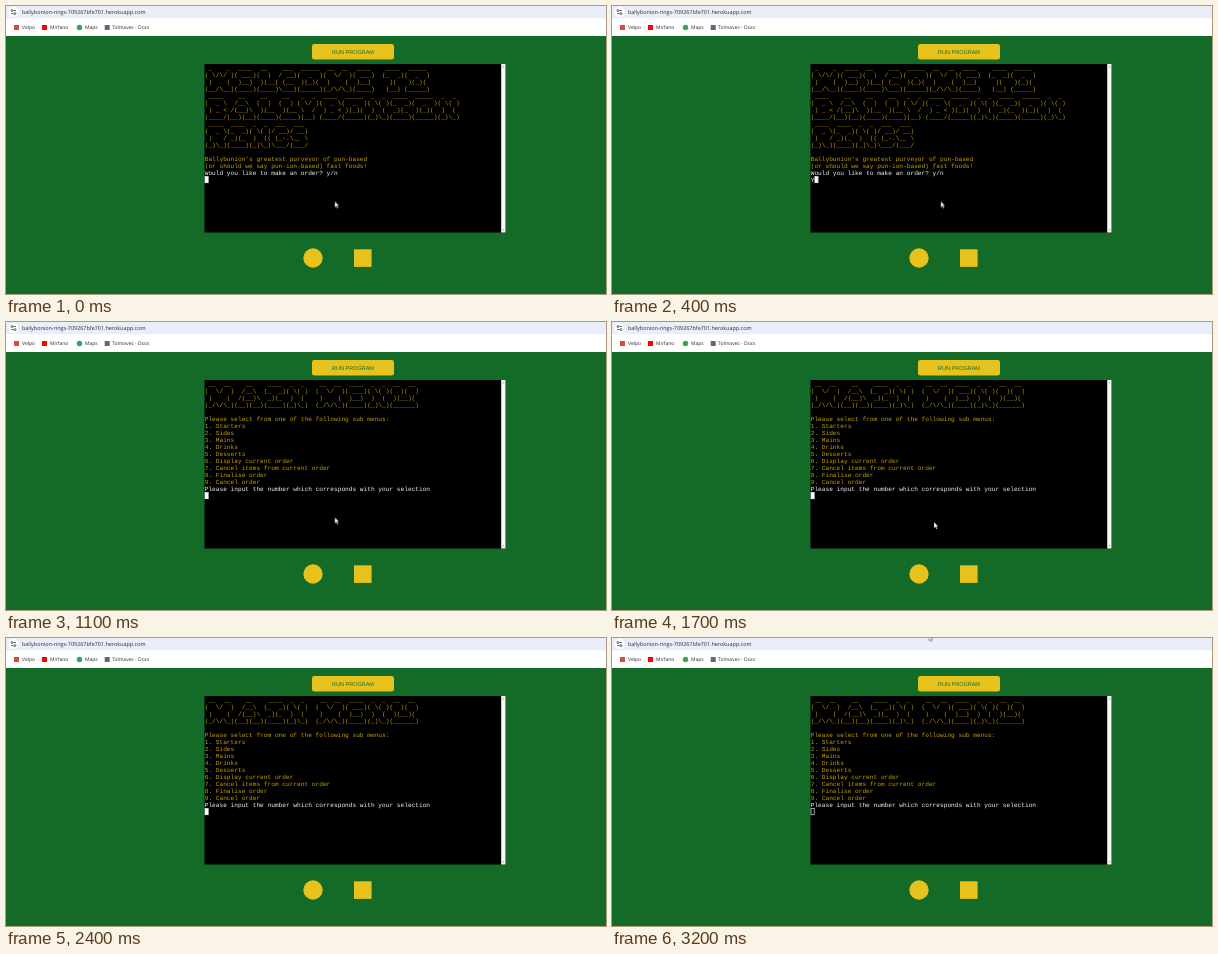
Write an HTML page that moves like this. It is 600 px wide and 288 px high and loops after 3.3 s.

```html
<!DOCTYPE html>
<html lang="en">
<head>
<meta charset="utf-8">
<title>Terminal order demo</title>
<style>
  html, body { margin: 0; width: 100%; height: 100%; overflow: hidden; background: #146a27; }
  svg { display: block; width: 600px; height: 288px; }
  text { text-rendering: geometricPrecision; }
  .bar { font-family: "Open Sans", "Noto Sans", sans-serif; fill: #2b2d30; }
  .url { font-size: 5.45px; }
  .mark { font-size: 5px; }
  .btn { font: 5.5px "Liberation Sans", Arial, sans-serif; fill: #146a27; text-anchor: middle; }
  .term { font: 6.175px "Liberation Mono", "Courier New", monospace; }
  .gold { fill: #c4a000; }
  .white { fill: #f4f4f4; }
</style>
</head>
<body>
<svg viewBox="0 0 600 288">
  <rect width="600" height="288" fill="#146a27"/>
  <rect width="600" height="30" fill="#fff"/>
  <rect width="600" height="12.3" fill="#e9eef8"/>
  <circle cx="7.5" cy="6" r="5" fill="#fff"/>
  <g fill="none" stroke="#3c4043" stroke-width=".8">
    <path d="M7.4 4.5H10M5 7.6H7.6"/>
    <circle cx="6" cy="4.5" r="1"/>
    <circle cx="9" cy="7.6" r="1"/>
  </g>
  <g class="bar">
    <text class="url" x="16" y="8.1">ballybonion-rings-709267bfe701.herokuapp.com</text>
    <g class="mark">
      <text x="16" y="23.2">Velpo</text>
      <text x="44" y="23.2">Mirfano</text>
      <text x="79" y="23.2">Maps</text>
      <text x="106" y="23.2">Tolmavec - Docs</text>
    </g>
  </g>
  <rect x="8" y="19" width="5" height="5" fill="#dc4a3d"/>
  <rect x="36" y="19" width="5" height="5" fill="#f00"/>
  <circle cx="73.5" cy="21.5" r="2.7" fill="#34a853"/>
  <rect x="98.7" y="19" width="5" height="5" fill="#66696d"/>

  <rect x="306" y="38" width="82" height="15.6" rx="2.4" fill="#e8c21c"/>
  <text class="btn" x="347" y="47.9">RUN PROGRAM</text>

  <rect x="198.5" y="58" width="301" height="168.5" fill="#000"/>
  <rect x="495.2" y="58" width="4.3" height="168.5" fill="#f8f8f8"/>
  <path d="M496.4 61.2l1-1.2 1 1.2zM496.4 223.3l1 1.2 1-1.2z" fill="#999"/>
  <g class="term">
    <g id="welcome"></g>
    <g id="menu"></g>
    <g id="reply"></g>
  </g>
  <rect id="block" x="199" y="58.5" width="3.2" height="6.3" fill="#fff" stroke="#fff" stroke-width=".6"/>

  <circle cx="307" cy="252" r="9.7" fill="#e8c21c"/>
  <rect x="348" y="243.3" width="17.6" height="17.6" fill="#e8c21c"/>

  <path id="mouse" d="M0 0V6.2L1.4 5 2.4 7.2 3.4 6.8 2.4 4.6H4.3Z" fill="#fff" stroke="#222" stroke-width=".4"/>
</svg>
<script>
const LOOP = 3300, COL = 3.705, ROW = 7;
const $ = id => document.getElementById(id);

const welcomeArt = String.raw`
 _    _  ____  __    ___  _____  __  __  ____    ____  _____
( \/\/ )( ___)(  )  / __)(  _  )(  \/  )( ___)  (_  _)(  _  )
 )    (  )__)  )(__( (__  )(_)(  )    (  )__)     )(   )(_)(
(__/\__)(____)(____)\___)(_____)(_/\/\_)(____)   (__) (_____)
 ____    __    __    __   _  _  ____  _____  _  _  ____  _____  _  _
(  _ \  /__\  (  )  (  ) ( \/ )(  _ \(  _  )( \( )(_  _)(  _  )( \( )
 ) _ < /(__)\  )(__  )(__ \  /  ) _ < )(_)(  )  (  _)(_  )(_)(  )  (
(____/(__)(__)(____)(____)(__) (____/(_____)(_)\_)(____)(_____)(_)\_)
 ____  ____  _  _  ___  ___
(  _ \(_  _)( \( )/ __)/ __)
 )   / _)(_  )  (( (_-.\__ \
(_)\_)(____)(_)\_)\___/(___/

Ballybunion's greatest purveyor of pun-based
(or should we say pun-ion-based) fast foods!`;

const menuArt = String.raw`
 __  __    __    ____  _  _    __  __  ____  _  _  __  __
(  \/  )  /__\  (_  _)( \( )  (  \/  )( ___)( \( )(  )(  )
 )    (  /(__)\  _)(_  )  (    )    (  )__)  )  (  )(__)(
(_/\/\_)(__)(__)(____)(_)\_)  (_/\/\_)(____)(_)\_)(______)

Please select from one of the following sub menus:
1. Starters
2. Sides
3. Mains
4. Drinks
5. Desserts
6. Display current order
7. Cancel items from current order
8. Finalise order
9. Cancel order`;

function print(id, text, color, row = 0) {
  text.split("\n").forEach((line, i) => {
    const t = document.createElementNS("http://www.w3.org/2000/svg", "text");
    t.setAttribute("x", 198.7);
    t.setAttribute("y", 58 + (row + i) * ROW + 5.6);
    t.setAttribute("class", color);
    t.textContent = line.replace(/ /g, "\u00a0");
    $(id).append(t);
  });
}

print("welcome", welcomeArt.slice(1), "gold");
print("welcome", "Would you like to make an order? y/n", "white", 15);
print("menu", menuArt.slice(1), "gold");
print("menu", "Please input the number which corresponds with your selection", "white", 15);
print("reply", "Y", "white", 16);

// Each step is [time in ms, value], held until the next one.
function play(id, prop, steps) {
  const frames = steps.map(([t, v]) => ({ offset: t / LOOP, [prop]: v, easing: "step-end" }));
  frames.push({ offset: 1, [prop]: steps.at(-1)[1] });
  $(id).animate(frames, { duration: LOOP, iterations: Infinity }).startTime = 0;
}

const move = (x, y) => `translate(${x}px, ${y}px)`;
const cell = (col, row) => move(col * COL, row * ROW);

play("welcome", "opacity", [[0, 1], [1100, 0]]);
play("menu", "opacity", [[0, 0], [1100, 1]]);
play("reply", "opacity", [[0, 0], [100, 1], [1100, 0]]);
play("block", "transform", [[0, cell(0, 16)], [100, cell(1, 16)], [1000, cell(0, 17)], [1100, cell(0, 16)]]);
play("block", "fill", [[0, "#fff"], [2700, "#000"]]);

const away = move(610, -20);
play("mouse", "transform", [
  [0, move(328.8, 195.3)],
  [1700, move(322, 200)], [1800, move(302, 210)], [1900, move(283, 219)],
  [2000, move(266.8, 225)], [2100, move(360, 165)], [2200, move(480, 83)],
  [2300, move(592, 12)], [2400, away], [3200, move(316.6, -3.6)]
]);
</script>
</body>
</html>
```
